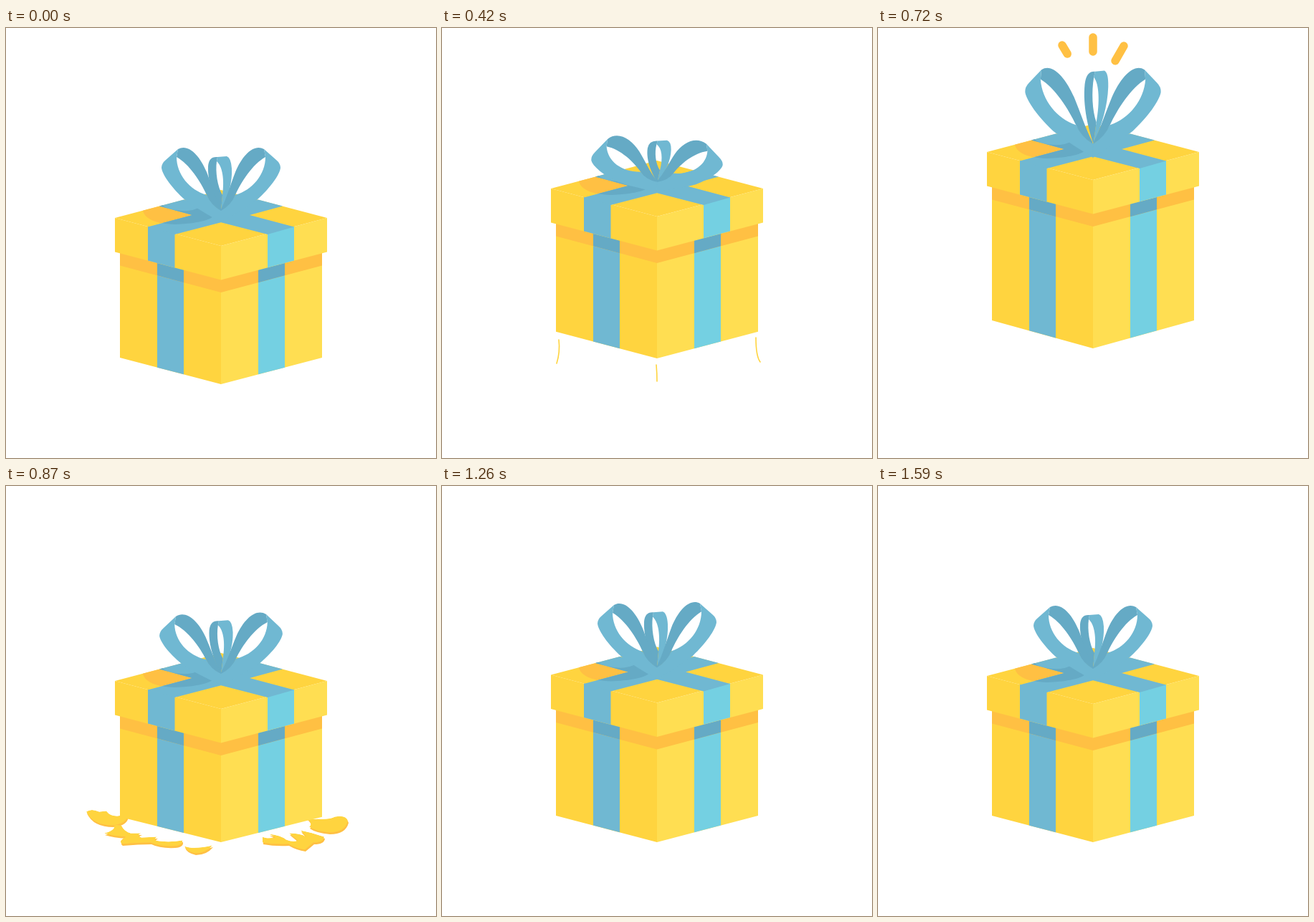
Write an HTML page with a canvas that moves like this. It is 600 px wide and 600 px high and loops after 1620 ms.

```html
<!DOCTYPE html>
<html lang="en">
<head>
<meta charset="utf-8">
<title>Jumping gift</title>
<style>
  html, body { margin: 0; width: 100%; height: 100%; overflow: hidden; background: #fff; }
  canvas { display: block; width: 100vmin; height: 100vmin; }
</style>
</head>
<body>
<canvas id="stage" width="600" height="600"></canvas>
<script>
const ctx = document.getElementById('stage').getContext('2d');
const LOOP = 1620;
const GOLD = '#ffd43f', PALE = '#ffde52', AMBER = '#ffc043';
const BLUE = '#70b8d2', DEEP = '#65aac5', AQUA = '#74d0e2';

// time, lid offset, base offset, bow spread, left loop height, right loop height
const KEYS = [
  [0, 0, 0, 0, -93, -93],
  [60, 0, 0, 0, -93, -93],
  [210, 27, 0, 0, -116, -116],
  [270, 27, 0, 3, -98, -98],
  [340, 0, 0, 6, -78, -76],
  [420, -41, -36, 9, -66, -59],
  [480, -85, -72, 10, -78, -74],
  [570, -112, -92, 12, -98, -98],
  [630, -116, -90, 12, -106, -106],
  [720, -92, -50, 12, -112, -112],
  [800, -40, 0, 8, -104, -106],
  [870, 7, 0, 3, -87, -90],
  [930, 24, 0, 0, -85, -86],
  [1020, 10, 0, 0, -85, -85],
  [1180, -9, 0, 0, -97, -97],
  [1260, -1.5, 0, 0, -94.5, -96.5],
  [1400, 0, 0, 0, -93, -93],
  [1620, 0, 0, 0, -93, -93]
];

const clamp = v => Math.max(0, Math.min(1, v));
const ramp = (t, a, b) => clamp((t - a) / (b - a));
const easeOut = p => 1 - (1 - p) ** 2;

const slope = (i, c) => KEYS[i] && KEYS[i + 1]
  ? (KEYS[i + 1][c] - KEYS[i][c]) / (KEYS[i + 1][0] - KEYS[i][0]) : 0;

// Monotone cubic through the keys
function tangent(i, c) {
  const a = slope(i - 1, c), b = slope(i, c);
  return a * b > 0 ? 2 * a * b / (a + b) : 0;
}

function track(t, c) {
  let i = 0;
  while (i < KEYS.length - 2 && t >= KEYS[i + 1][0]) i++;
  const a = KEYS[i], b = KEYS[i + 1], h = b[0] - a[0], p = (t - a[0]) / h, q = 1 - p;
  return a[c] * (1 + 2 * p) * q * q + tangent(i, c) * h * p * q * q
    + b[c] * p * p * (3 - 2 * p) - tangent(i + 1, c) * h * p * p * q;
}

function paint(path, color) {
  ctx.fillStyle = color;
  ctx.fill(path);
}

const poly = (color, ...pts) => paint(new Path2D('M' + pts.join('L') + 'Z'), color);

function paintInside(mask, path, color) {
  ctx.save();
  ctx.clip(mask);
  paint(path, color);
  ctx.restore();
}

const TOP = new Path2D('M152 265L300 226L448 265L300 304Z');
const CROSS = new Path2D('M198 277.5L260 261L214 248.5L248 239.5L300 253L352 239.5' +
  'L386 248.5L340 261L402 277.5L365 288L300 271.3L235.5 288Z');
const SHADE = new Path2D('M191 252C190 267 214 274 236 274C260 273 281 270 289 263' +
  'L269 251Q262 254 254 255Q236 256 222 250L214 244Z');

const LOOP_BACK = new Path2D('M-60 -92C-46 -100 -30 -84 -20 -60C-13 -42 -8 -24 0 -8' +
  'L0 -6Q-14 -14 -20 -28C-28 -46 -44 -71 -62 -81Z');
const LOOP_FRONT = new Path2D('M-60 -92L-77 -77Q-83 -72 -83 -66C-82 -56 -68 -37 -50 -21' +
  'Q-34 -9 0 10L0 -6Q-12 -14 -20 -28C-44 -35 -62 -57 -62 -81Z');
const MID_BACK = new Path2D('M-5 -81Q-17 -82 -18 -68C-19 -45 -8 -20 0 -6L2 -28C-5 -40 -8 -60 -6 -75Z');
const MID_FRONT = new Path2D('M-5 -81L8 -82Q14 -80 15 -65C16 -45 10 -25 0 -6L2 -28C5 -50 2 -68 -6 -75Z');

// Splash pieces: outline, centre, drift
const SPLASH = [
  ['M113 457Q120 452 131 457L141 456Q146 463 156 463L171 461Q170 474 150 476Q122 476 113 457Z', 142, 465, -37, 8],
  ['M138 487Q150 484 152 479Q148 474 162 476Q165 484 175 487L190 487Q182 490 190 493L212 492' +
   'Q204 497 216 498Q230 500 247 497Q248 504 236 505Q215 506 203 500Q185 500 163 502' +
   'Q157 498 168 492Q150 491 138 487Z', 190, 492, -26, 20],
  ['M250 505Q262 510 289 504Q280 515 265 515Q252 512 250 505Z', 268, 509, -5, 30],
  ['M359 492Q364 495 377 493L368 488Q385 490 392 496Q402 500 408 497L396 487Q412 487 420 492L412 483' +
   'Q428 486 445 492Q444 500 430 500Q424 505 418 510Q405 508 395 502Q375 503 359 500Z', 405, 496, 26, 20],
  ['M420 465Q428 468 436 467Q452 468 460 464Q476 461 478 470Q474 486 452 486Q432 484 424 478Q430 474 420 465Z',
   452, 475, 37, 8]
].map(([d, ...rest]) => [new Path2D(d), ...rest]);

function drawSplash(t) {
  if (t < 800 || t >= 1250) return;
  const grow = easeOut(ramp(t, 780, 870));
  const drift = easeOut(ramp(t, 870, 1130)) - 0.7 * (1 - grow);
  const size = grow * (1 - ramp(t, 1130, 1250));
  for (const [path, x, y, dx, dy] of SPLASH) {
    ctx.save();
    ctx.translate(x + dx * drift, y + dy * drift);
    ctx.scale(size, size);
    ctx.translate(-x, -y);
    paint(path, AMBER);
    ctx.translate(-1, -2.5);
    paintInside(path, path, GOLD);
    ctx.restore();
  }
}

const TRAILS = new Path2D('M163 435Q165 452 160 468M299 470Q300 482 300 493M438 432Q438 458 444 466');

function drawTrails(t) {
  if (t < 385 || t > 475) return;
  ctx.strokeStyle = GOLD;
  ctx.lineWidth = 1.6;
  ctx.lineCap = 'round';
  ctx.stroke(TRAILS);
}

// Inner end, outer end, time at which the tail starts to follow
const SPARKS = [[272, 49, 257, 24, 668], [300, 48, 300, 13, 677], [328, 51, 343, 25, 700]];

function drawSparks(t) {
  ctx.strokeStyle = AMBER;
  ctx.lineWidth = 11.5;
  ctx.lineCap = 'round';
  for (const [x0, y0, x1, y1, start] of SPARKS) {
    const head = ramp(t, 615, 690), tail = ramp(t, start, start + 100);
    if (head <= 0 || tail >= 1) continue;
    ctx.beginPath();
    ctx.moveTo(x0 + (x1 - x0) * tail, y0 + (y1 - y0) * tail);
    ctx.lineTo(x0 + (x1 - x0) * head, y0 + (y1 - y0) * head);
    ctx.stroke();
  }
}

function drawBody(lid, base) {
  const d = lid - base, front = 497 + base;
  const rise = 37 - d * (d > 0 ? 0.26 : 0.05);
  const low = x => front - Math.abs(x - 300) / 141 * rise;
  const high = x => 352 + lid - Math.abs(x - 300) * 0.266;
  const panel = (color, a, b) => poly(color, [a, high(a)], [b, high(b)], [b, low(b)], [a, low(a)]);
  const shade = (color, a, b) =>
    poly(color, [a, high(a) - 4], [b, high(b) - 4], [b, high(b) + 17], [a, high(a) + 17]);
  panel(GOLD, 159, 300);
  panel(PALE, 300, 441);
  panel(BLUE, 211, 248);
  panel(AQUA, 352, 389);
  shade(AMBER, 159, 300);
  shade(AMBER, 300, 441);
  shade(DEEP, 211, 248);
  shade(DEEP, 352, 389);
}

function drawLid() {
  const edge = x => 304 - Math.abs(x - 300) * 0.2635;
  const face = (color, a, b) =>
    poly(color, [a, edge(a)], [b, edge(b)], [b, edge(b) + 47.5], [a, edge(a) + 47.5]);
  paint(TOP, GOLD);
  face(GOLD, 152, 300);
  face(PALE, 300, 448);
  face(BLUE, 198, 235.5);
  face(AQUA, 365, 402);
  paintInside(TOP, SHADE, AMBER);
  paint(CROSS, BLUE);
  paintInside(CROSS, SHADE, DEEP);
}

// Linear map about the knot that carries the fold and the outer bend to their new places
function drawLoop(side, spread, up) {
  const fx = -60 - spread, ox = -83 - spread, fy = up, oy = up + 23 + spread * 0.4;
  const det = -3519;
  ctx.save();
  ctx.scale(side, 1);
  ctx.transform((93 * ox - 70 * fx) / det, (93 * oy - 70 * fy) / det,
    (83 * fx - 60 * ox) / det, (83 * fy - 60 * oy) / det, 0, 0);
  paint(LOOP_FRONT, BLUE);
  paint(LOOP_BACK, DEEP);
  ctx.restore();
}

function drawBow(spread, left, right) {
  ctx.save();
  ctx.translate(300, 261);
  ctx.save();
  ctx.transform(1, 0, -spread * 0.65 / 81, (left + right) / -186 + spread * 0.011, 0, 0);
  paint(MID_FRONT, BLUE);
  paint(MID_BACK, DEEP);
  ctx.restore();
  drawLoop(1, spread, left);
  drawLoop(-1, spread, right);
  ctx.restore();
}

function draw(t) {
  const [lid, base, spread, left, right] = [1, 2, 3, 4, 5].map(c => track(t, c));
  ctx.clearRect(0, 0, 600, 600);
  drawSplash(t);
  drawTrails(t);
  drawBody(lid, base);
  ctx.save();
  ctx.translate(0, lid);
  drawLid();
  drawBow(spread, left, right);
  ctx.restore();
  drawSparks(t);
}

// 30 ms steps; every tenth step holds the one before
function stepped(t) {
  const n = Math.floor(t / 30);
  return 30 * (n && n % 10 === 0 ? n - 1 : n);
}

const start = performance.now();
function tick() {
  draw(stepped((performance.now() - start) % LOOP));
  requestAnimationFrame(tick);
}
tick();
</script>
</body>
</html>
```
